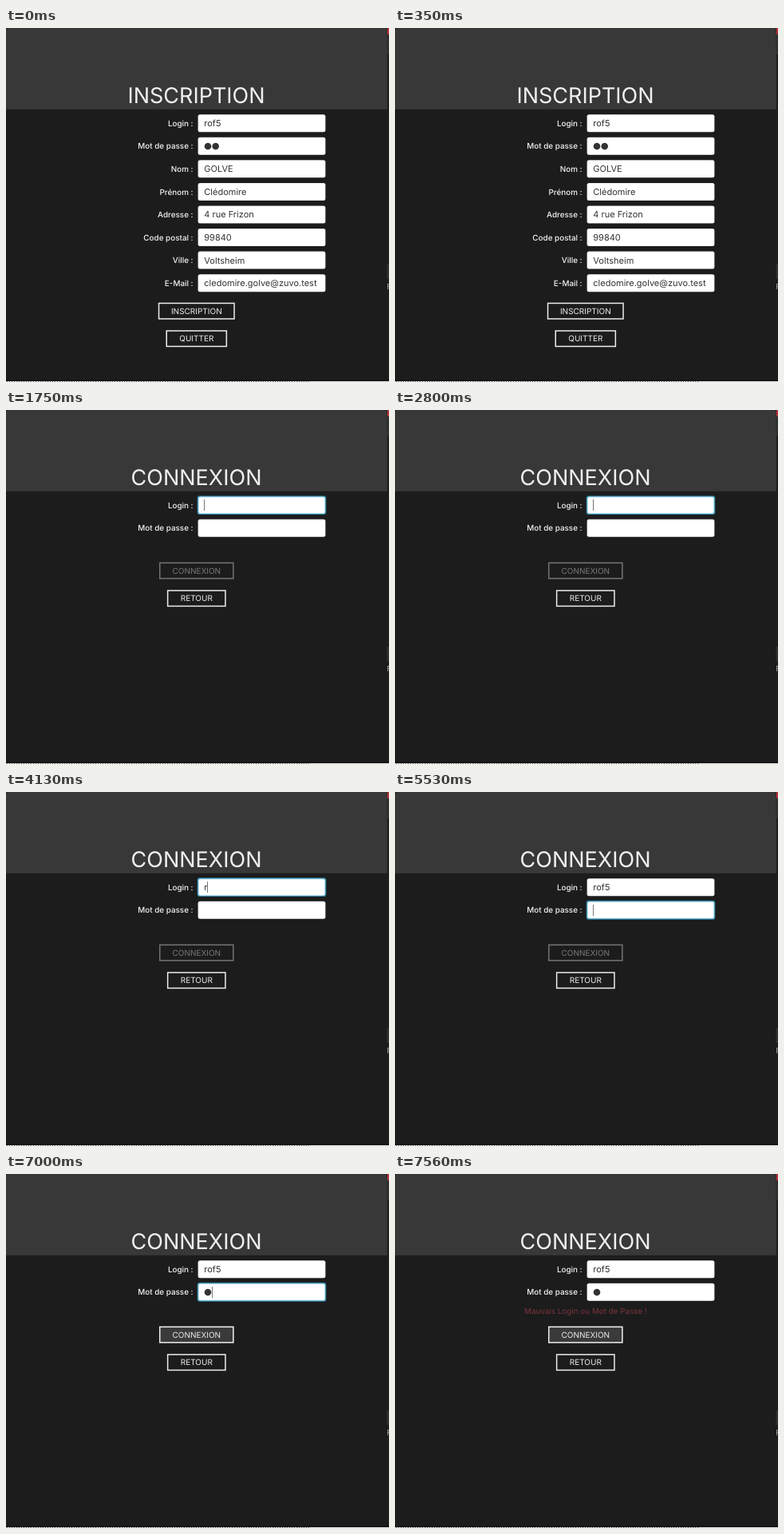
An HTML page with a canvas for the animation above (8 s loop, 480x443 px).

```html
<!DOCTYPE html>
<html lang="fr">
<head>
<meta charset="utf-8">
<title>Inscription</title>
<style>
  html, body { margin: 0; width: 100%; height: 100%; overflow: hidden; background: #1c1c1c; }
  canvas { display: block; width: 480px; height: 443px; }
</style>
</head>
<body>
<canvas id="stage" width="480" height="443"></canvas>
<script>
const ctx = document.getElementById('stage').getContext('2d');
const LOOP = 8000;
const MID = 238.8;
const FIELD = { x: 240.6, w: 159.8, h: 22, textX: 248.3 };
const LOGIN = 'rof5';
const PROFILE = [
  ['Login :', LOGIN],
  ['Mot de passe :', ''],
  ['Nom :', 'GOLVE'],
  ['Prénom :', 'Clédomire'],
  ['Adresse :', '4 rue Frizon'],
  ['Code postal :', '99840'],
  ['Ville :', 'Voltsheim'],
  ['E-Mail :', 'cledomire.golve@zuvo.test']
];
const TYPED_AT = [4130, 4480, 4690, 5110];
const CARET_OFF = [[2240, 2800], [3290, 3850], [6020, 6580], [7280, 7560]];

const rowY = i => 119.2 + i * 28.57;
const within = (t, a, b) => t >= a && t < b;

function rect(x, y, w, h, color) {
  ctx.fillStyle = color;
  ctx.fillRect(x, y, w, h);
}

function roundRect(x, y, w, h, r, color) {
  ctx.fillStyle = color;
  ctx.beginPath();
  ctx.roundRect(x, y, w, h, r);
  ctx.fill();
}

function text(str, x, y, size, color, align = 'left', weight = 400) {
  ctx.font = `${weight} ${size}px Inter, sans-serif`;
  ctx.textRendering = 'geometricPrecision';
  ctx.textAlign = align;
  ctx.fillStyle = color;
  ctx.fillText(str, x, y);
}

function backdrop(title) {
  rect(0, 0, 480, 443, '#1c1c1c');
  roundRect(0, 0, 477.8, 101.7, [3, 3, 0, 0], '#383838');

  // slivers of the windows behind
  rect(478, 0, 2, 443, '#1e1e1e');
  rect(478, 0, 2, 8, '#b8303c');
  rect(478, 8, 2, 25, '#303030');
  rect(477.5, 296, 2.5, 18, '#303030');
  rect(478, 320, 1, 7, '#969696');
  rect(479, 320, 1, 1, '#888');
  rect(479, 323, 1, 1, '#888');
  rect(0, 440, 480, 2, '#141414');
  rect(0, 442, 480, 1, '#e4e4e4');
  for (let x = 1; x < 382; x += 3) rect(x, 442, 1, 1, '#777');

  text(title, MID - 0.3, 94.2, 27, '#f0f0f0', 'center');
}

function field(row, label, focused) {
  const y = rowY(row), { x, w, h } = FIELD;
  const layer = (inset, r, color) =>
    roundRect(x + inset, y - h / 2 + inset, w - 2 * inset, h - 2 * inset, r, color);
  text(label, 234.6, y + 3.7, 9.9, '#f4f4f4', 'right', 500);
  if (focused) {
    layer(-0.9, 3, '#2b7f9f');
    layer(0.1, 2.5, '#8fcbe2');
    layer(1, 2, '#fff');
  } else {
    layer(0, 2.5, '#e6e6e6');
    layer(0.6, 2.2, '#fff');
  }
}

function value(row, str) {
  text(str, FIELD.textX, rowY(row) + 4, 11, '#333');
}

function dots(count) {
  ctx.fillStyle = '#333';
  for (let i = 0; i < count; i++) {
    ctx.beginPath();
    ctx.arc(253 + i * 9.7, rowY(1) + 0.2, 4.3, 0, Math.PI * 2);
    ctx.fill();
  }
}

function caret(row, x) {
  rect(Math.round(x), Math.round(rowY(row)) - 7, 1, 14, '#777');
}

function button(label, cy, w, state = 'normal') {
  const x = MID - w / 2, h = 21, y = cy - h / 2;
  const disabled = state === 'disabled';
  if (state === 'pressed') rect(x, y, w, h, '#fff');
  else {
    if (state === 'hover') rect(x, y, w, h, '#3a3a3a');
    const line = 1.5;
    ctx.strokeStyle = disabled ? '#747474' : '#ededed';
    ctx.lineWidth = line;
    ctx.strokeRect(x + line / 2, y + line / 2, w - line, h - line);
  }
  const ink = { pressed: '#222', disabled: '#787878' }[state] || '#ececec';
  text(label, MID, cy + 3.7, 10, ink, 'center');
}

function signUp(t) {
  backdrop('INSCRIPTION');
  PROFILE.forEach(([label, str], i) => {
    field(i, label, false);
    value(i, str);
  });
  dots(2);
  button('INSCRIPTION', 354.2, 96, t >= 1680 ? 'pressed' : t >= 560 ? 'hover' : 'normal');
  button('QUITTER', 388.7, 76.6);
}

function signIn(t) {
  const onLogin = t < 5530;
  const failed = t >= 7560;
  const hasPassword = t >= 6720;
  const login = LOGIN.slice(0, TYPED_AT.filter(at => t >= at).length);

  backdrop('CONNEXION');
  field(0, 'Login :', onLogin);
  field(1, 'Mot de passe :', !onLogin && !failed);
  value(0, login);
  const loginEnd = FIELD.textX + ctx.measureText(login).width;
  if (hasPassword) dots(1);

  if (!failed && !CARET_OFF.some(([a, b]) => within(t, a, b))) {
    if (onLogin) caret(0, loginEnd - 0.4);
    else caret(1, hasPassword ? 258 : 248);
  }

  if (failed) text('Mauvais Login ou Mot de Passe !', 239, 174.8, 9.9, '#7b343e', 'center');
  button('CONNEXION', 201.1, 93.6, t >= 7000 ? 'hover' : hasPassword ? 'normal' : 'disabled');
  button('RETOUR', 235.7, 73.8, within(t, 6510, 6580) ? 'hover' : 'normal');
}

const start = performance.now();

function draw() {
  const t = (performance.now() - start) % LOOP;
  if (t < 1750) signUp(t);
  else signIn(t);
  requestAnimationFrame(draw);
}
draw();
</script>
</body>
</html>
```
